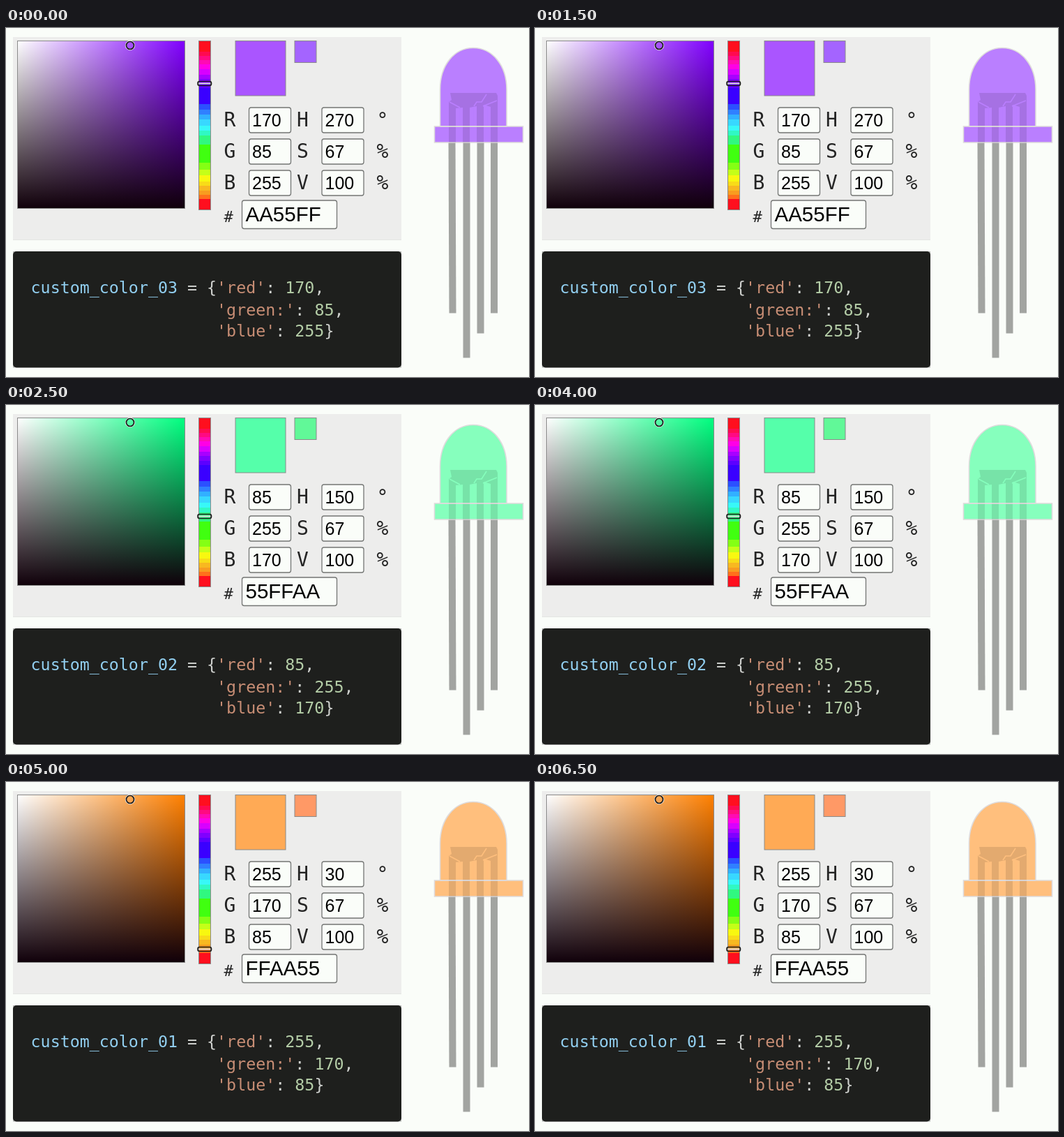
Write an HTML page that moves like this. It is 750 by 500 pixels and loops after 7500 ms.

```html
<!DOCTYPE html>
<html lang="en">
<head>
<meta charset="utf-8">
<title>Custom LED colors</title>
<style>
  html, body { margin: 0; width: 100%; height: 100%; overflow: hidden; background: #fafdf9; }
  svg { display: block; width: 750px; height: 500px; }
  text { white-space: pre; }
  .label { font: 28px "DejaVu Sans Mono", monospace; fill: #242424; }
  .hash { font-size: 22px; }
  .value { font: 25px "Liberation Sans", Arial, sans-serif; fill: #000; }
  .hex { font-size: 29.5px; }
  .code { font: 23.3px "DejaVu Sans Mono", monospace; fill: #d0d2cf; }
  .name { fill: #92cff0; }
  .str { fill: #c88e75; }
  .num { fill: #b4cda7; }
  .field { fill: #fafdf9; stroke: #747674; stroke-width: 1.3; }
  .frame { stroke: #8a8a8a; }
  .state { animation: show 7.5s step-end infinite; }
  @keyframes show {
    0% { visibility: visible; }
    33.33333%, 100% { visibility: hidden; }
  }
</style>
</head>
<body>
<svg viewBox="0 0 750 500">
  <defs>
    <linearGradient id="white">
      <stop stop-color="#fff"/><stop offset="1" stop-color="#fff" stop-opacity="0"/>
    </linearGradient>
    <linearGradient id="black" x2="0" y2="1">
      <stop stop-color="#10000a" stop-opacity="0"/><stop offset="1" stop-color="#10000a"/>
    </linearGradient>
  </defs>

  <rect x="10" y="13" width="557" height="291" fill="#ededec"/>
  <path d="M10 303.5H567" stroke="#e3e5e2"/>
  <rect x="10" y="320" width="557" height="166.5" fill="#b4b6b3"/>
  <rect x="10" y="320" width="557" height="166.5" rx="5" fill="#1e1f1d"/>

  <g id="hues"></g>
  <rect class="frame" x="276.5" y="18.5" width="17" height="242" fill="none"/>
  <g id="fields"></g>

  <g fill="#a2a4a1">
    <path d="M634.500 164h10l1 244.500h-10z"/>
    <path d="M655.500 164h10v308.500h-10z"/>
    <path d="M675.500 164h10v273.500h-10z"/>
    <path d="M695 164h10v244.500h-10z"/>
  </g>

  <g id="states"></g>
</svg>
<script>
(() => {
  const $ = id => document.getElementById(id);
  const text = (x, y, cls, s) => `<text x="${x}" y="${y}" class="${cls}">${s}</text>`;
  const rows = [0, 45, 90];

  const states = [
    { id: "03", rgb: [170, 85, 255], hsv: [270, 67, 100], near: "#a464ff", lamp: "#ba7fff" },
    { id: "02", rgb: [85, 255, 170], hsv: [150, 67, 100], near: "#61f898", lamp: "#86ffbd" },
    { id: "01", rgb: [255, 170, 85], hsv: [30, 67, 100], near: "#ff9966", lamp: "#ffbf7d" }
  ];

  // Hue strip: lower edge and colour of each band
  const bands = [
    [34, "#ff0f1e"], [40, "#ff0a50"], [46, "#ff0a82"], [52, "#ff0ab4"], [59, "#ff00e6"],
    [67, "#d800ff"], [73, "#a800ff"], [80, "#8000ff"], [86, "#5c00ff"], [109, "#3a00ff"],
    [117, "#2b50ff"], [124, "#3080ff"], [131, "#32b0ff"], [140, "#38d8ff"], [147, "#38f8f8"],
    [154, "#30f8c4"], [167, "#30f880"], [193, "#40ff10"], [203, "#84ff14"], [211, "#c4ff18"],
    [220, "#f8f810"], [226, "#f8dc18"], [233, "#f8b820"], [239, "#f89c20"], [245, "#ff701c"],
    [260, "#ff0f1e"]
  ];
  $("hues").innerHTML = bands.map(([end, color], i) => {
    const start = i ? bands[i - 1][0] : 19;
    return `<rect x="277" y="${start}" width="16" height="${end - start}" fill="${color}"/>`;
  }).join("");

  const field = (x, y, w, h) =>
    `<rect class="field" x="${x}" y="${y}" width="${w}" height="${h}" rx="3"/>`;
  $("fields").innerHTML = rows.map((dy, i) =>
    text(312.5, 141 + dy, "label", "RGB"[i]) + field(348.5, 114 + dy, 60, 36) +
    text(417, 141 + dy, "label", "HSV"[i]) + field(453, 114 + dy, 60, 36) +
    text(531.5, 141 + dy, "label", "°%%"[i])
  ).join("") + text(312.5, 278, "label hash", "#") + field(338.5, 247, 136, 40.5);

  const swatch = (x, w, h, fill) =>
    `<rect class="frame" x="${x}" y="18.5" width="${w}" height="${h}" fill="${fill}"/>`;

  const picker = hue => {
    const area = fill => swatch(16.5, 240, 240, fill);
    const y = 259 - hue / 360 * 240;
    return area(`hsl(${hue}, 100%, 50%)`) + area("url(#white)") + area("url(#black)") +
      `<g fill="none">
        <circle cx="178" cy="25" r="6.6" stroke="#ddd" stroke-width="1.2"/>
        <circle cx="178" cy="25" r="5.5" stroke="#1c1c1c" stroke-width="1.7"/>
        <rect x="275" y="${y - 2.5}" width="19.5" height="6" rx="2.5" stroke="#1c1c1c" stroke-width="1.6"/>
        <path d="M276.500 ${y + .5}H293" stroke="#ddd" stroke-width="2"/>
      </g>`;
  };

  const lamp = color => `
    <g fill="${color}" stroke="#dedbdc" stroke-width="1.6">
      <path d="M622.500 141V88C622.500 53 643 28.500 670 28.500S718 53 718 88V141Z"/>
      <path d="M614.500 141H741.500V164H614.500Z"/>
    </g>
    <path d="M637 93H703L705 97V164H695V113L685 110V164H675V112L665 114V164H655V114L645 115V164H635V106L639 103Z"
      opacity=".11"/>
    <path d="M636 106L651 114M671 112L675 106H682L689 95M684 112L704 104M650 115V140M670 115V140M690 115V140"
      fill="none" stroke="${color}" stroke-width="1.6"/>
    <path d="M622.500 141H718" stroke="#dedbdc" stroke-width="1.6"/>`;

  const code = ({ id, rgb }) => {
    const pad = " ".repeat(19);
    const span = (cls, s) => `<tspan class="${cls}">${s}</tspan>`;
    const entry = (key, i, end) => span("str", `'${key}'`) + ": " + span("num", rgb[i]) + end;
    return [
      [380, span("name", "custom_color_" + id) + " = {" + entry("red", 0, ",")],
      [411.5, pad + entry("green:", 1, ",")],
      [442, pad + entry("blue", 2, "}")]
    ].map(([y, line]) => text(35.6, y, "code", line)).join("");
  };

  $("states").innerHTML = states.map((s, i) => {
    const hex = s.rgb.map(v => v.toString(16).toUpperCase()).join("");
    return `<g class="state" style="animation-delay:${i * 2.5 - 7.5}s">` +
      picker(s.hsv[0]) + swatch(329, 72, 78.5, "#" + hex) + swatch(414, 31, 31, s.near) +
      rows.map((dy, k) =>
        text(353, 141 + dy, "value", s.rgb[k]) + text(457.5, 141 + dy, "value", s.hsv[k])).join("") +
      text(343.5, 277, "value hex", hex) + code(s) + lamp(s.lamp) + "</g>";
  }).join("");
})();
</script>
</body>
</html>
```
